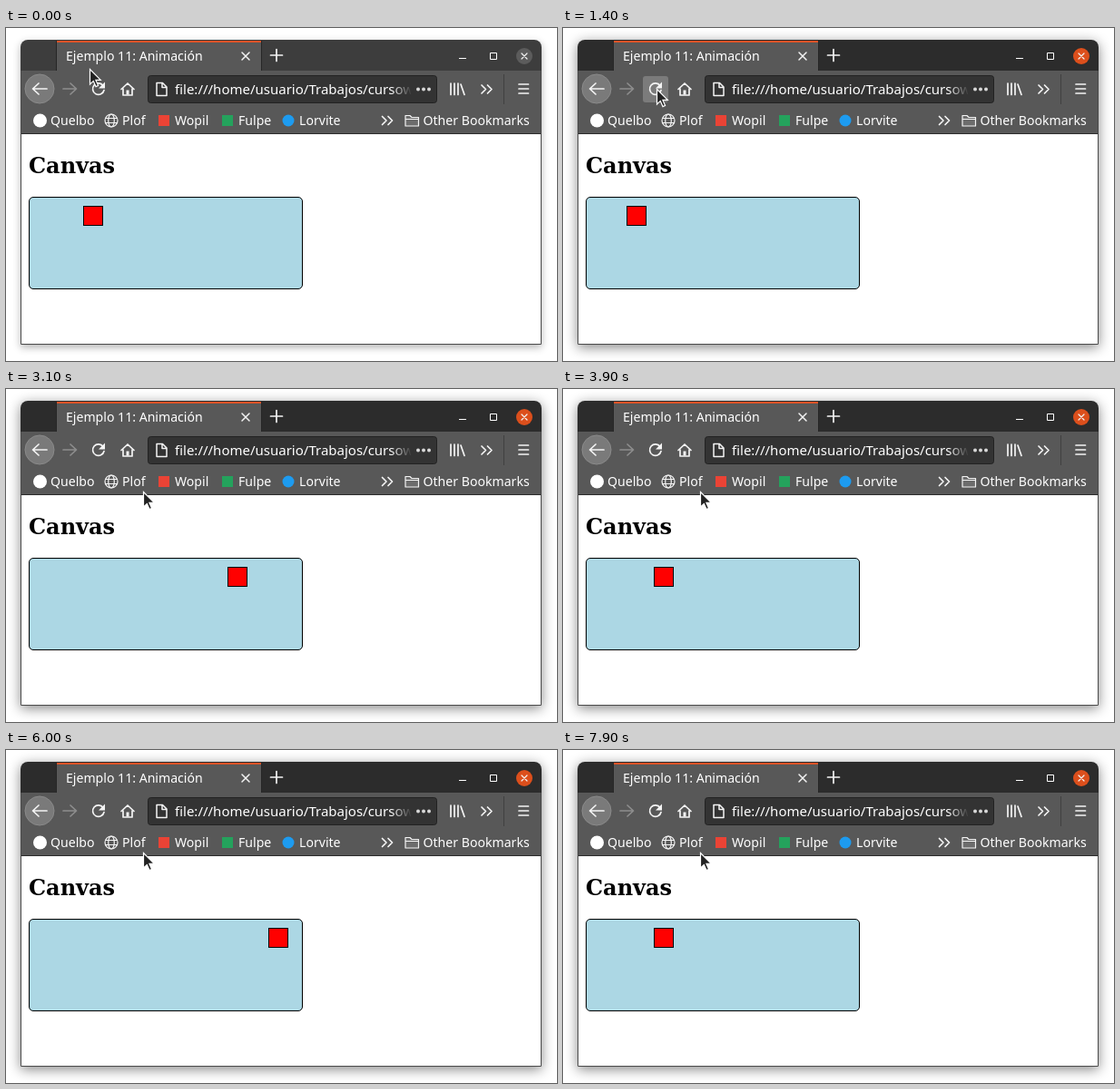
An HTML page for the animation above (8000 ms loop, 607 by 367 pixels).

```html
<!DOCTYPE html>
<html lang="es">
<head>
<meta charset="utf-8">
<title>Canvas</title>
<style>
  html, body { margin: 0; width: 100%; height: 100%; overflow: hidden; background: #fff; }
  #win {
    position: absolute; left: 16px; top: 13px; width: 574px; height: 336px;
    border-radius: 8px 8px 0 0; background: #fff;
    box-shadow: 0 3px 9px rgba(0, 0, 0, .3);
  }
  svg { position: absolute; left: 0; top: 0; display: block; }
  .ui { font: 14.1px "Noto Sans", "Open Sans", sans-serif; fill: #fff; }
  .url { font-size: 15px; }
  .head { font: bold 24px "DejaVu Serif", "Noto Serif", serif; fill: #000; }
  .line { fill: none; stroke: #f4f4f4; stroke-width: 1.7; stroke-linecap: round; stroke-linejoin: round; }
  .thin { stroke-width: 1.2; }
  #bar { fill: #3d3d3d; }
  #close { fill: #5c5c5c; }
  #hover { fill: #7b7b7b; visibility: hidden; }
  .focus #win { box-shadow: 0 3px 14px rgba(0, 0, 0, .48); }
  .focus #bar { fill: #2c2c2c; }
  .focus #close { fill: #dc4f1c; }
  .over #hover { visibility: visible; }
</style>
</head>
<body>
<div id="win"></div>
<svg width="607" height="367" viewBox="0 0 607 367">
  <defs>
    <linearGradient id="fade">
      <stop offset="0" stop-color="#333" stop-opacity="0"/>
      <stop offset="1" stop-color="#333"/>
    </linearGradient>
    <clipPath id="urlClip"><rect x="180" y="53" width="266" height="29"/></clipPath>
    <clipPath id="boxClip"><rect x="26" y="187" width="300" height="100"/></clipPath>
    <path id="more" d="M0 0l4.5 4.5L0 9M6.5 0l4.5 4.5L6.5 9"/>
  </defs>

  <!-- title bar and tab -->
  <path id="bar" d="M16 47V21a8 8 0 0 1 8-8h558a8 8 0 0 1 8 8v26z"/>
  <rect x="56" y="14" width="225" height="33" fill="#585858"/>
  <rect x="56" y="14" width="225" height="2" fill="#dc5226"/>
  <path d="M281.5 14v33M55.5 14v33" stroke="#262626"/>
  <text class="ui" x="66" y="36">Ejemplo 11: Animación</text>
  <path class="line" style="stroke-width:1.5" d="M260 27l8 8m0-8l-8 8"/>
  <path class="line" d="M298 23.5v13m-6.5-6.5h13"/>
  <path d="M499 33.5h8M533.5 27.5h7v7h-7z" fill="none" stroke="#fff"/>
  <circle id="close" cx="571" cy="31" r="9"/>
  <path class="line thin" d="M568 28l6 6m0-6l-6 6"/>

  <!-- toolbar -->
  <rect x="16" y="47" width="574" height="70" fill="#585858"/>
  <rect id="hover" x="88" y="53" width="28" height="29" rx="3"/>
  <circle cx="37" cy="67" r="16" fill="#7a7a7a" stroke="#8a8a8a"/>
  <path class="line" d="M45 67H30m6-6l-6.5 6l6.5 6"/>
  <path class="line" style="stroke:#8d8d8d" d="M63 67h14m-6-6l6.5 6l-6.5 6"/>
  <path class="line" d="M107 63.5a6.3 6.3 0 1 0 1 5"/>
  <path d="M109 59.500v7h-7z" fill="#f4f4f4"/>
  <path class="line" d="M127 67.5l7-6.5l7 6.5M129 67v7h10v-7"/>
  <rect x="132.5" y="68.5" width="3" height="5" fill="#f4f4f4"/>
  <rect x="156.5" y="52.5" width="318" height="30" rx="3" fill="#333" stroke="#222"/>
  <path class="line" style="stroke-width:1.5" d="M166 60.5h6.5l4.500 4.500v9.500h-11zM172 61v4.500h4.500"/>
  <g clip-path="url(#urlClip)">
    <text class="ui url" x="186" y="73">file:///home/usuario/Trabajos/cursoweb</text>
    <rect x="424" y="54" width="23" height="27" fill="url(#fade)"/>
  </g>
  <g fill="#d8d8d8">
    <circle cx="454" cy="67.5" r="2"/><circle cx="460" cy="67.5" r="2"/><circle cx="466" cy="67.5" r="2"/>
  </g>
  <path class="line" d="M490 61v12.500M494 61v12.500M498 61v12.500M501 62l4 11.500"/>
  <use href="#more" class="line" x="524" y="63"/>
  <path d="M548.5 51v33" stroke="#404040"/>
  <path class="line" d="M565 62h10.500M565 67h10.500M565 72h10.500"/>

  <!-- bookmarks -->
  <circle cx="37.5" cy="102" r="7.500" fill="#fff"/>
  <g class="line thin">
    <circle cx="116" cy="102" r="7"/>
    <ellipse cx="116" cy="102" rx="3.300" ry="7"/>
    <path d="M110 99.500h12M110 104.500h12"/>
  </g>
  <rect x="168" y="96" width="12" height="12" fill="#ea4335"/>
  <rect x="238" y="96" width="12" height="12" fill="#24a25c"/>
  <circle cx="311" cy="102" r="6.500" fill="#1d9bf0"/>
  <g class="ui">
    <text x="49" y="107">Quelbo</text>
    <text x="128" y="107">Plof</text>
    <text x="186" y="107">Wopil</text>
    <text x="256" y="107">Fulpe</text>
    <text x="323" y="107">Lorvite</text>
    <text x="459.5" y="107">Other Bookmarks</text>
  </g>
  <use href="#more" class="line" x="414.5" y="97.5"/>
  <path class="line thin" style="fill:#6c6c6c" d="M440 108V96.500h5l2 2h7.500v9.500zM440 100.500h14.500"/>
  <path d="M16 116.5h574" stroke="#2b2b2b"/>

  <!-- page -->
  <path d="M16.5 47v301.500h573V47" fill="none" stroke="#4a4a4a"/>
  <text class="head" x="25" y="160">Canvas</text>
  <rect x="25.5" y="186.5" width="301" height="101" rx="4.5" fill="#acd7e4" stroke="#000"/>
  <g clip-path="url(#boxClip)">
    <rect id="square" x="25.5" y="196.5" width="21" height="21" fill="#f00" stroke="#000"/>
  </g>
  <path id="cursor" d="M0 0v16.500l3.800-3.600l2.700 6.200l2.600-1.100l-2.700-6.100h5.400z" fill="#222" stroke="#fff" stroke-width="1.2"/>
</svg>
<script>
  const LOOP = 8000, TICK = 100, SPAN = 282, STEP = 3, RELOAD = 1150;

  // [time, distance travelled]; the square bounces between 0 and SPAN
  const before = [[0, -60], [1000, 111], [RELOAD, 138]];
  const after = [
    [RELOAD, 0], [2000, 150], [2700, 270], [3100, 345], [3600, 435], [4500, 594], [4700, 624],
    [5400, 759], [6000, 864], [6300, 924], [7200, 1074], [7900, 1203], [LOOP, 1221]
  ];
  // [time, x, y]
  const pointer = [
    [0, 92.5, 45.5], [200, 92.5, 45.5], [700, 103.5, 67.5],
    [2200, 103.5, 67.5], [2600, 151.5, 113.5], [LOOP, 151.5, 113.5]
  ];

  const byId = id => document.getElementById(id);
  const square = byId("square"), cursor = byId("cursor"), root = document.body.classList;

  function at(points, t, i = 1) {
    const n = Math.max(1, points.findIndex(p => p[0] >= t));
    const a = points[n - 1], b = points[n];
    return a[i] + (b[i] - a[i]) * (t - a[0]) / (b[0] - a[0]);
  }

  function bounce(d) {
    const u = Math.abs(d) % (2 * SPAN);
    return u > SPAN ? 2 * SPAN - u : u;
  }

  function draw() {
    const t = Math.floor(performance.now() % LOOP / TICK) * TICK;
    const d = at(t < RELOAD ? before : after, t);
    square.setAttribute("x", 25.5 + bounce(Math.round(d / STEP) * STEP));

    const x = at(pointer, t), y = at(pointer, t, 2);
    cursor.setAttribute("transform", `translate(${x} ${y})`);
    root.toggle("over", x >= 88 && x < 116 && y >= 53 && y < 82);
    root.toggle("focus", t >= 1100);
    requestAnimationFrame(draw);
  }
  draw();
</script>
</body>
</html>
```
